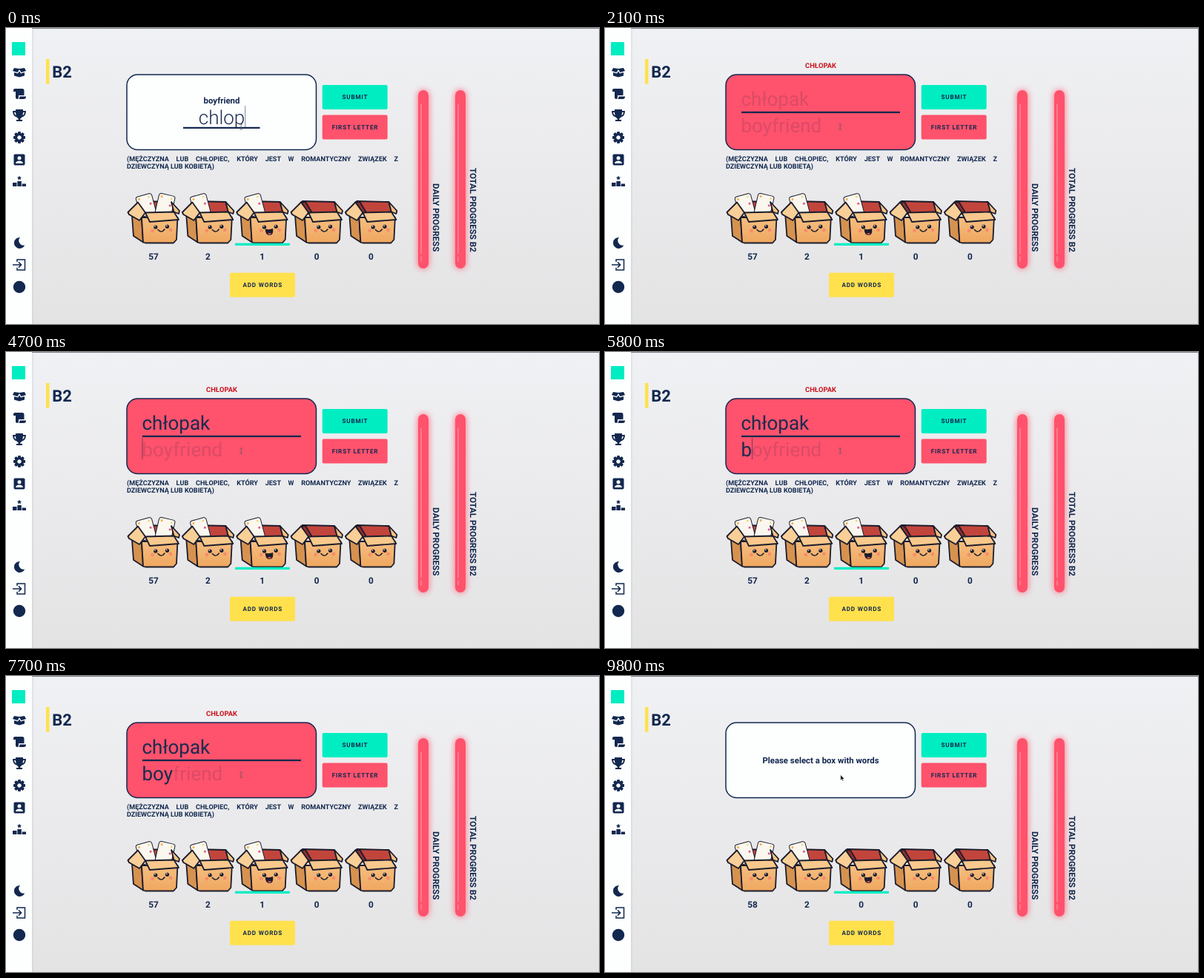
These frames come from a looping animation (800x400 px, 9900 ms). An HTML page:

```html
<!DOCTYPE html>
<html lang="en">
<head>
<meta charset="utf-8">
<title>Word boxes</title>
<style>
html, body { margin: 0; width: 100%; height: 100%; overflow: hidden; }
body { position: relative; background: #ebebed; font-family: Roboto, sans-serif; color: #12284f; text-rendering: geometricPrecision; }
svg { position: absolute; left: 0; top: 0; display: block; }
text { font-family: Roboto, sans-serif; fill: #12284f; font-weight: 700; white-space: pre; }
.mid { text-anchor: middle; }
.btn { font-size: 8.2px; letter-spacing: .8px; font-weight: 600; text-anchor: middle; }
.entry { font-size: 26px; font-weight: 400; fill: #1d2c50; }
#guess { font-weight: 300; }
.ghost { fill-opacity: .16; }
#hint { position: absolute; left: 163px; top: 172.5px; width: 366px; font: 700 9.1px/10.3px Roboto, sans-serif; }
#hint div { white-space: nowrap; }
#hint div:first-child { text-align: justify; text-align-last: justify; }
</style>
</head>
<body>
<svg width="800" height="400" viewBox="0 0 800 400">
  <defs>
    <linearGradient id="bg" x1="0" y1="0" x2="0" y2="1">
      <stop offset="0" stop-color="#f0f1f4"/><stop offset="1" stop-color="#e4e3e4"/>
    </linearGradient>
    <linearGradient id="front" x1="0" y1="0" x2="0" y2="1">
      <stop offset="0" stop-color="#f6be80"/><stop offset="1" stop-color="#efa75f"/>
    </linearGradient>
    <filter id="glow" x="-200%" y="-10%" width="500%" height="120%"><feGaussianBlur stdDeviation="5"/></filter>
    <filter id="soft" x="-30%" y="-5%" width="160%" height="110%"><feGaussianBlur stdDeviation="1.5"/></filter>
  </defs>
  <rect width="800" height="400" fill="url(#bg)"/>
  <rect width="800" height="1" fill="#7d818c"/>
  <rect width="36" height="400" fill="#9aa0ac" opacity=".3" filter="url(#soft)"/>
  <rect width="35" height="400" fill="#fdfefe"/>
  <rect x="8" y="19" width="18" height="18" fill="#00edc2"/>
  <g id="icons" fill="#12284f"></g>
  <circle cx="18" cy="350" r="8.2" fill="#12284f"/>

  <rect x="54" y="42" width="4.5" height="33.5" fill="#ffe14d"/>
  <text x="62.3" y="67" font-size="22">B2</text>

  <g id="bars"></g>

  <text id="answer" class="mid" x="291" y="53.5" font-size="9.4" style="fill:#c9121c">CHŁOPAK</text>
  <rect id="card" x="163" y="63" width="255.5" height="101.5" rx="14.5" stroke="#12284f" stroke-width="1.5"/>

  <g id="ask">
    <text class="mid" x="291" y="102.3" font-size="11.4">boyfriend</text>
    <text id="guess" class="entry mid" x="291" y="130"></text>
    <rect x="239" y="133.8" width="103.5" height="2.2" fill="#12284f"/>
  </g>
  <g id="fix">
    <text class="entry ghost" x="183.5" y="105">chłopak</text>
    <text class="entry ghost" x="183.5" y="141">boyfriend</text>
    <text id="top" class="entry" x="183.5" y="105"></text>
    <text id="low" class="entry" x="183.5" y="141"></text>
    <rect x="184" y="112.8" width="214" height="2.3" fill="#12284f"/>
  </g>
  <text id="done" class="mid" x="291" y="118" font-size="11.4">Please select a box with words</text>
  <rect id="caret" width="1" height="29" fill="#12284f" opacity=".55"/>
  <path id="beam" d="M315.3 130h1.2l.7.6.7-.6h1.2M317.2 130.6v6M315.3 137.2h1.2l.7-.6.7.6h1.2" fill="none" stroke="#555b68" stroke-width=".8"/>
  <path id="arrow" d="M317.8 133.6v7.4l1.7-1.5 1.2 2.6 1.2-.6-1.2-2.4h2.3z" fill="#111" stroke="#fff" stroke-width=".5"/>

  <g id="buttons"></g>
  <g id="boxes"></g>
  <rect x="309" y="290.8" width="74" height="3.2" rx="1" fill="#00edc2"/>
</svg>
<div id="hint"><div>(MĘŻCZYZNA LUB CHŁOPIEC, KTÓRY JEST W ROMANTYCZNY ZWIĄZEK Z</div><div>DZIEWCZYNĄ LUB KOBIETĄ)</div></div>

<script>
const $ = id => document.getElementById(id);
const LOOP = 9900, WRONG = 1300, NEXT = 4500, DONE = 9500;
const RED = '#ff526c';

// Sidebar icons, drawn around their own centre
const gear = Array.from({ length: 8 }, (_, i) =>
  `<rect x="-1.9" y="-8" width="3.8" height="5" rx=".8" transform="rotate(${i * 45})"/>`).join('');
const icons = [
  [60, '<path d="M-7-6L0-5 7-6 9-2 2.5 0 0-4-2.5 0-9-2zM-7 0L-2 1.5 0-1.5 2 1.5 7 0V4.5L0 6.5-7 4.5z"/>'],
  [89, '<path d="M-8-7H4Q6.5-7 6.5-4V2H-1V5Q-1 7-3 7T-5 5V-3H-8V-5Q-8-7-6-7zM.5 3.5H9Q9 7 6 7H-1Q.5 6 .5 3.5z"/>'],
  [118, '<path d="M-5-8H5V-6H9Q9 1 3.5 2.5 2.5 4 1.3 4.4V6H4V8H-4V6H-1.3V4.4Q-2.5 4-3.5 2.5-9 1-9-6H-5zM-7-4Q-6.6-1-4.3 0-5-2-5-4zM7-4H5Q5-2 4.3 0 6.6-1 7-4z" fill-rule="evenodd"/>'],
  [148, gear + '<circle r="4.5" fill="none" stroke="#12284f" stroke-width="3.4"/>'],
  [178, '<rect x="-7.5" y="-7.5" width="15" height="15" rx="1.8"/><circle cy="-2.2" r="2.5" fill="#fff"/><path d="M-5 5Q-4.5 1.5 0 1.5T5 5z" fill="#fff"/>'],
  [208, '<path d="M-9 1H-3.5V6H-9zM-2.6-1H2.8V6H-2.6zM3.7 2.5H9V6H3.7zM0-8.5l.9 1.9 2.1.3-1.5 1.5.4 2.1L0-3.7l-1.9 1 .4-2.1L-3-6.3l2.1-.3z"/>'],
  [290.5, '<path d="M1-7.5A7.5 7.5 0 1 0 7.3 3 6.4 6.4 0 0 1 1-7.5z"/>'],
  [320, '<path d="M-3-4V-7H7.5V7H-3V4M-9 0H2.5M-1-3.6L2.6 0-1 3.6" fill="none" stroke="#12284f" stroke-width="1.5"/>']
];
$('icons').innerHTML = icons.map(([y, art]) => `<g transform="translate(18 ${y})">${art}</g>`).join('');

const bar = (x, label, y) => `
  <rect x="${x}" y="84" width="14" height="241" rx="7" fill="${RED}" opacity=".9" filter="url(#glow)"/>
  <rect x="${x}" y="84" width="14" height="241" rx="7" fill="${RED}"/>
  <path d="M${x + 4} 103V305M${x + 4} 309V315" stroke="#ff9aa9" stroke-width="1.1" stroke-linecap="round"/>
  <text transform="translate(${x + 20} ${y}) rotate(90)" font-size="11.6">${label}</text>`;
$('bars').innerHTML = bar(556, 'DAILY PROGRESS', 210) + bar(606, 'TOTAL PROGRESS B2', 189);

const button = (x, y, fill, label) => `
  <rect x="${x}" y="${y}" width="88" height="33" rx="2" fill="${fill}"/>
  <text class="btn" x="${x + 44.3}" y="${y + 19.3}">${label}</text>`;
$('buttons').innerHTML = button(426.7, 77, '#00edc2', 'SUBMIT') +
  button(426.7, 117.5, RED, 'FIRST LETTER') + button(302, 330.7, '#ffe14d', 'ADD WORDS');

const poly = (fill, points) => `<polygon points="${points}" fill="${fill}"/>`;
const paper = (x, y, turn) => `
  <g transform="translate(${x} ${y}) rotate(${turn})">
    <rect x="-11" y="-12.5" width="22" height="28" rx="3" fill="#faf7ef" stroke-width="1"/>
    <g stroke="none"><circle cx="-7" cy="-8.5" r="1.5" fill="#f4b04e"/><circle cx="6.5" cy="-8.5" r="1.2" fill="#e8d35a"/>
    <circle cx="6.5" cy="1" r="1.5" fill="#e0568b"/></g>
  </g>`;
const eye = (x, y) => `<circle cx="${x}" cy="${y}" r="2.6" fill="#1b1c2c"/><circle cx="${x - .7}" cy="${y - .9}" r=".8" fill="#fff"/>`;
const smile = '<path d="M6 272.5Q10.5 278 15 272" fill="none" stroke="#1b1c2c" stroke-width="1.5" stroke-linecap="round"/>';
const laugh = '<path d="M4 271.5Q9.5 273 14.5 271 15.5 280 9.8 280T4 271.5z" fill="#1b1c2c"/><path d="M7 278Q9.5 276 12.4 277.7 11 279.4 9.5 279.2z" fill="#e8505b"/>';

function box(i, papers) {
  const x = 199 + i * 73.35;
  return `<g transform="translate(${x} 0)">
    <g stroke="#1b1c2c" stroke-width="1.8" stroke-linejoin="round">
      ${poly('#c2453c', '-21,235.5 -19,234 24,235 28,250 -11,251')}
      ${poly('#8f302d', '-21,235.5 -15,235 -6,250 -11,251')}
      ${papers}
      ${poly('#d6924f', '-29,254 -27,281 -14,289.5 -16,258')}
      ${poly('url(#front)', '-16,256 -14,289.5 -11,290.5 27,290.5 31,286 32.5,256')}
      ${poly('#f9cf98', '-21,235.5 -34.5,249 -33,252 -19,260 -11,249.5')}
      ${poly('#f7c283', '24,235 35,247 34,251 27.5,248.5')}
      ${poly('#f8c88c', '-11,249.5 27.5,248.5 34,259 -5,262')}
    </g>
    <circle cx="-1.5" cy="274" r="2.4" fill="#f58d6b"/><circle cx="23" cy="273" r="2.4" fill="#f58d6b"/>
    ${eye(2.8, 269)}${eye(18.5, 268.3)}${i === 2 ? laugh : smile}
  </g>
  <text id="n${i}" class="mid" x="${x}" y="313" font-size="11.8">0</text>`;
}
const left = paper(-10.5, 238, -15);
$('boxes').innerHTML = [left + paper(16, 237.5, 13), left, `<g id="lastCard">${left}</g>`, '', '']
  .map((p, i) => box(i, p)).join('');
$('n1').textContent = 2;

// Key presses: each word with the times of its letters
const first = { el: $('guess'), word: 'chlopak', keys: [-500, -400, -300, -200, -100, 300, 600] };
const upper = { el: $('top'), word: 'chłopak', keys: [2500, 2800, 3100, 3300, 3500, 3900, 4100] };
const lower = { el: $('low'), word: 'boyfriend', keys: [5600, 6300, 7200, 7800, 8400, 8700, 8900, 9100, 9300] };

function type({ el, word, keys }, t) {
  const n = keys.filter(k => k <= t).length;
  el.textContent = word.slice(0, n);
  return n;
}
const show = (id, on) => { $(id).style.display = on ? '' : 'none'; };

function draw(t) {
  const done = t >= DONE, asking = t < WRONG, fixing = !asking && !done;
  show('ask', asking);
  show('fix', fixing);
  show('answer', fixing);
  show('done', done);
  show('arrow', done);
  show('beam', !done);
  show('hint', !done);
  show('lastCard', !done);
  $('card').setAttribute('fill', fixing ? RED : '#fdfefe');
  $('n0').textContent = done ? 58 : 57;
  $('n2').textContent = done ? 0 : 1;
  for (const f of [first, upper, lower]) type(f, t);

  const field = asking ? first : t < NEXT ? upper : lower;
  const n = type(field, t);
  const since = n ? field.keys[n - 1] : field === upper ? WRONG : NEXT;
  show('caret', !done && (t - since) % 1000 < 500);
  if (done) return;
  const w = n ? field.el.getComputedTextLength() : 0;
  const x = field === first ? 291 + w / 2 : 183.5 + w;
  const base = +field.el.getAttribute('y');
  $('caret').setAttribute('x', x);
  $('caret').setAttribute('y', base - 25);
}

const start = performance.now();
function tick() {
  const t = (performance.now() - start) % LOOP;
  draw(Math.floor(t / 100) * 100);
  requestAnimationFrame(tick);
}
draw(0);
requestAnimationFrame(tick);
</script>
</body>
</html>
```
